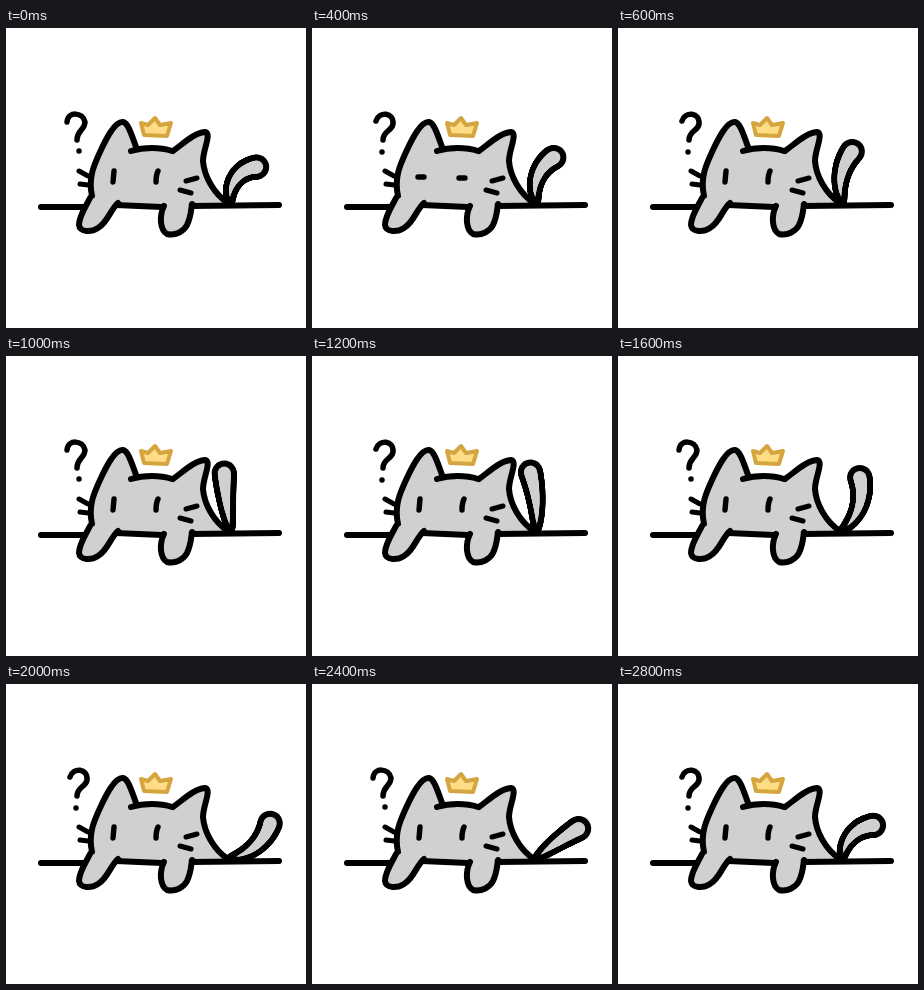
Recreate the animation shown at these times as an HTML page with a canvas. Size 300 px wide and 300 px high, loop 3 s.

```html
<!DOCTYPE html>
<html lang="en">
<head>
<meta charset="utf-8">
<title>Curious cat</title>
<style>
  html, body { margin: 0; width: 100%; height: 100%; overflow: hidden; background: #fff; }
  canvas { display: block; width: 100vmin; height: 100vmin; }
</style>
</head>
<body>
<canvas id="stage" width="300" height="300"></canvas>
<script>
const ctx = document.getElementById('stage').getContext('2d');
const GREY = '#d0d0d0', BLACK = '#000', LINE = 6;
const STEP = 200, STEPS = 15;

const LEFT_EAR = '86 168 C82 150 88 137 94 124 C100 111 109 93 117 94 C123 95 127 112 131 121';
const FOREHEAD = '125 123 C138 119 154 119 166 123';
const BACK = '167 123 C178 115 188 105 199 104 C206 105 197 122 197 133 C198 148 208 166 222 175';
const BODY = `M${LEFT_EAR} L${FOREHEAD} L${BACK} L186 180 L86 178 Z`;
const OUTLINE = `M${LEFT_EAR} M${FOREHEAD} M${BACK}`;
const TABLE = 'M35 179 H80 M110 177 L156 179 M185 178 L273 177';
const LEFT_PAW = 'M84 170 C79 180 73 188 73 197 C74 205 86 204 92 200 C102 194 104 182 112 175';
const RIGHT_PAW = 'M158 178 C153 188 154 202 161 206 C170 208 178 203 181 197 C185 189 185 182 186 176';
const WHISKERS = 'M73 143 L82 148 M74 156 L82 157 M180 153 L191 150 M174 162 L185 165';
const EYES_OPEN = 'M108 143 L107 154 M152 143 Q150 147 150 154';
const EYES_CLOSED = 'M106 149 H112 M147 150 H153';
const CROWN = 'M135 95 L142 97 L149 90 L154 97 L165 95 L161 108 L138 107 Z';
const QUESTIONS = [
  'M61 94 C62 83 77 84 79 94 C79 102 71 102 71 112 M73 123 h.01',
  'M64 93 C67 83 82 84 81 96 C80 103 71 103 71 112 M70 124 h.01'
];

function paint(shape, { fill, stroke, width = LINE }) {
  const path = new Path2D(shape);
  if (fill) {
    ctx.fillStyle = fill;
    ctx.fill(path);
  }
  if (stroke) {
    ctx.strokeStyle = stroke;
    ctx.lineWidth = width;
    ctx.stroke(path);
  }
}

// The tail bends evenly from a root heading to a tip heading (degrees);
// the root leads the tip, which makes it whip from side to side.
function drawTail(step) {
  const turn = 2 * Math.PI / STEPS;
  const rootPhase = turn * (step - 2.5);
  const swing = Math.cos(turn * (step - 7));
  const root = 70 + 48 * Math.cos(rootPhase) - 12 * Math.cos(2 * rootPhase);
  const tip = 57 + 53 * swing;
  const length = 54 + 5 * swing;
  const segments = 80;

  for (const [color, inset] of [[BLACK, 0], [GREY, LINE]]) {
    let x = 224.5, y = 174;
    ctx.fillStyle = color;
    for (let i = 0; i <= segments; i++) {
      const u = i / segments;
      const heading = (root + (tip - root) * u) * Math.PI / 180;
      const radius = Math.max(0, 4 + 8.5 * u ** 0.6 - inset);
      ctx.beginPath();
      ctx.arc(x, y, radius, 0, 2 * Math.PI);
      ctx.fill();
      x += Math.cos(heading) * length / segments;
      y -= Math.sin(heading) * length / segments;
    }
  }
}

function drawCat(eyesClosed) {
  paint(BODY, { fill: GREY });
  paint(OUTLINE, { stroke: BLACK });
  paint(TABLE, { stroke: BLACK });
  paint(LEFT_PAW, { fill: GREY, stroke: BLACK });
  paint(RIGHT_PAW, { fill: GREY, stroke: BLACK });
  paint(WHISKERS, { stroke: BLACK, width: 5 });
  paint(eyesClosed ? EYES_CLOSED : EYES_OPEN, { stroke: BLACK, width: 5.4 });
  paint(CROWN, { fill: '#ffdc86', stroke: '#d5a53f', width: 4 });
}

function draw(now) {
  const step = Math.floor(now / STEP) % STEPS;
  ctx.fillStyle = '#fff';
  ctx.fillRect(0, 0, 300, 300);
  ctx.lineCap = ctx.lineJoin = 'round';
  drawTail(step);
  drawCat(step === 2 || step === 4);
  paint(QUESTIONS[(step >> 1) % 2], { stroke: BLACK, width: 5.5 });
  requestAnimationFrame(draw);
}
requestAnimationFrame(draw);
</script>
</body>
</html>
```
